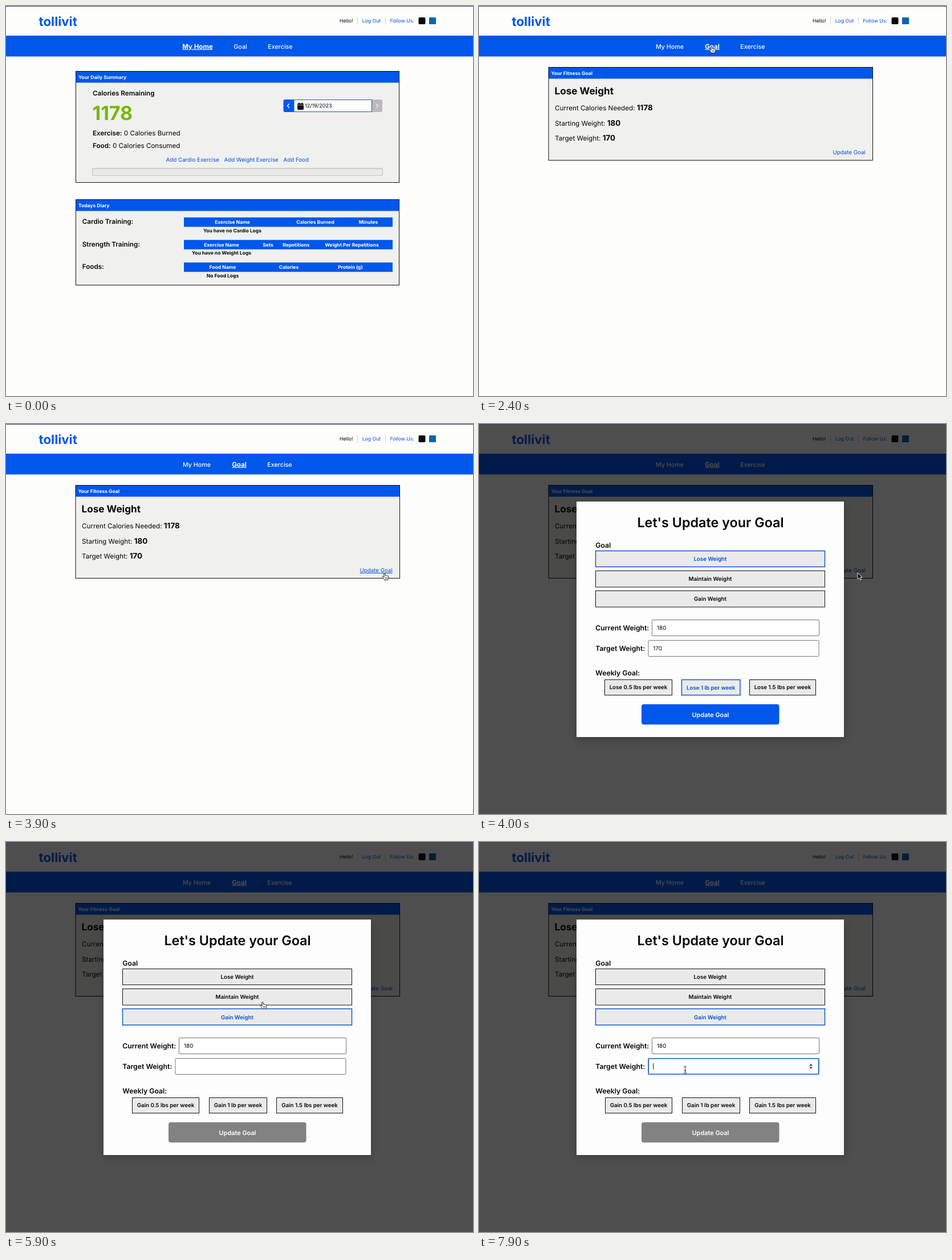
Write an HTML page that moves like this. It is 819 by 684 pixels and loops after 8000 ms.

```html
<!DOCTYPE html>
<html lang="en">
<head>
<meta charset="utf-8">
<title>Fitness goal demo</title>
<style>
html, body { margin: 0; width: 100%; height: 100%; overflow: hidden; background: #fdfdfc; }
svg { display: block; width: 819px; height: 684px; font-family: Inter, sans-serif; font-optical-sizing: none; text-rendering: geometricPrecision; }
text { white-space: pre; }
</style>
</head>
<body>
<svg id="stage" viewBox="0 0 819 684"></svg>
<script>
const BLUE = '#0057eb', LINK = '#0050d8', EDGE = '#0d5ad2', INK = '#050505', CARD = '#f0f0ee', LOOP = 8000;
const stage = document.getElementById('stage');

const text = (x, y, size, weight, str, fill = INK, anchor = 'start', extra = '') =>
  `<text x="${x}" y="${y}" font-size="${size}" font-weight="${weight}" fill="${fill}" text-anchor="${anchor}" ${extra}>${str}</text>`;
const mid = (x, y, size, weight, str, fill, extra) => text(x, y, size, weight, str, fill, 'middle', extra);
const box = (x, y, r, b, fill, stroke = 'none', width = 1, round = 0) =>
  `<rect x="${x}" y="${y}" width="${r - x}" height="${b - y}" rx="${round}" fill="${fill}" stroke="${stroke}" stroke-width="${width}"/>`;
const path = (d, fill, stroke = 'none', width = 1) =>
  `<path d="${d}" fill="${fill}" stroke="${stroke}" stroke-width="${width}" stroke-linejoin="round" stroke-linecap="round"/>`;
const group = (id, body) => `<g id="${id}">${body}</g>`;
const strong = (str, size) => `<tspan font-weight="700" font-size="${size}">${str}</tspan>`;
const under = 'text-decoration="underline"';

function header() {
  return text(57.5, 34.5, 22.3, 700, 'tollivit', BLUE) +
    text(585, 28.7, 8.7, 400, 'Hello!') +
    text(624.7, 28.7, 8.7, 400, 'Log Out', LINK) +
    text(673.5, 28.7, 8.7, 400, 'Follow Us:', LINK) +
    box(616, 19, 617, 33, '#cfcfcf') + box(665, 19, 666, 33, '#cfcfcf') +
    box(723.5, 20, 735.5, 32, '#0a0a0a', 'none', 0, 2) +
    box(742, 20, 754, 32, '#0b66b0', 'none', 0, 1) +
    box(0, 52, 819, 88.5, BLUE);
}

function card(x, y, r, b, title) {
  return box(x, y, r, b, CARD) + box(x, y, r, y + 20, BLUE) + box(x, y, r, b, 'none', '#111') +
    text(x + 4.5, y + 13.5, 8.5, 700, title, '#fff');
}

function table(y, label, heads, empty, emptyX) {
  return text(133.8, y + 11.4, 11.65, 600, label) + box(312, y, 678, y + 16.5, BLUE) +
    heads.map(([x, str]) => mid(x, y + 11.5, 8.5, 700, str, '#fff')).join('') +
    mid(emptyX, y + 26, 8.5, 700, empty);
}

function homePage() {
  return mid(336, 74.7, 11.5, 700, 'My Home', '#fff', under) +
    mid(411, 74.7, 10.7, 500, 'Goal', '#fff', 'id="homeGoal"') +
    mid(481, 74.7, 10.7, 500, 'Exercise', '#fff') +
    card(122.5, 114.5, 689.5, 309.5, 'Your Daily Summary') +
    text(152, 157.4, 11.65, 600, 'Calories Remaining') +
    text(151.5, 200.3, 34, 700, '1178', '#74b80a') +
    text(152, 227, 11.65, 400, '<tspan font-weight="600">Exercise:</tspan> 0 Calories Burned') +
    text(152, 249, 11.65, 400, '<tspan font-weight="600">Food:</tspan> 0 Calories Consumed') +
    mid(327.3, 273.3, 9.75, 400, 'Add Cardio Exercise', LINK) +
    mid(430.2, 273.3, 9.75, 400, 'Add Weight Exercise', LINK) +
    mid(508.7, 273.3, 9.75, 400, 'Add Food', LINK) +
    box(151.5, 284.5, 660.5, 297.5, '#e9e9e7', '#c6c6c4', 1, 1.5) +
    box(152, 285, 660, 286.5, '#d6d6d4') +
    box(486.5, 164, 510, 186, BLUE, 'none', 0, 3) +
    box(636, 164, 660, 186, '#bababa', 'none', 0, 3) +
    box(505, 164.5, 641.5, 185.5, '#fff', '#1d5aa8') +
    path('M496.6 171.8l-3.2 3.3 3.2 3.3', 'none', '#fff', 1.4) +
    path('M649.2 171.8l3.2 3.3-3.2 3.3', 'none', '#f4f4f4', 1.3) +
    box(511, 171, 522, 182, '#050505', 'none', 0, 1.4) +
    box(513, 169.5, 514.6, 172, '#050505') + box(518.4, 169.5, 520, 172, '#050505') +
    box(511, 173.4, 522, 174.1, '#fff') +
    text(524, 178.4, 9.1, 400, '12/19/2023') +
    card(122.5, 339.5, 689.5, 489.5, 'Todays Diary') +
    table(370.8, 'Cardio Training:', [[397, 'Exercise Name'], [542.5, 'Calories Burned'], [635.5, 'Minutes']], 'You have no Cardio Logs', 397) +
    table(410.3, 'Strength Training:', [[378, 'Exercise Name'], [459.5, 'Sets'], [508.7, 'Repetitions'], [606.5, 'Weight Per Repetitions']], 'You have no Weight Logs', 378) +
    table(449.8, 'Foods:', [[380, 'Food Name'], [496, 'Calories'], [604, 'Protein (g)']], 'No Food Logs', 380);
}

function goalPage() {
  return mid(334.5, 74.7, 10.7, 500, 'My Home', '#fff') +
    mid(409, 74.7, 11.5, 700, 'Goal', '#fff', under) +
    mid(480, 74.7, 10.7, 500, 'Exercise', '#fff') +
    card(122, 107.5, 690.5, 270.5, 'Your Fitness Goal') +
    text(132.6, 155.2, 17.1, 700, 'Lose Weight') +
    text(133, 183.2, 11.7, 400, 'Current Calories Needed: ' + strong('1178', 13.4)) +
    text(133, 209.5, 11.7, 400, 'Starting Weight: ' + strong('180', 13.4)) +
    text(133, 235.7, 11.7, 400, 'Target Weight: ' + strong('170', 13.4)) +
    mid(649.2, 260, 9.75, 400, 'Update Goal', LINK, 'id="update"');
}

function choice(x, y, r, b, str, on) {
  return box(x, y, r, b, '#ebeaea', on ? EDGE : '#111', on ? 1.5 : 1) +
    mid((x + r) / 2, (y + b) / 2 + (on ? 3.8 : 3.3), 9.7, 600, str, on ? LINK : INK);
}

function modalFrame() {
  return box(0, 1, 819, 684, 'rgba(0,0,0,.69)') +
    '<g filter="url(#soft)">' + box(171, 141, 640, 554, 'rgba(0,0,0,.22)') + '</g>' +
    box(171, 136, 640, 549, '#fdfdfd') +
    mid(406, 180.5, 23.35, 600, "Let's Update your Goal") +
    text(204.3, 216.6, 12.25, 600, 'Goal') +
    text(204.3, 362, 12.25, 600, 'Current Weight:') +
    text(204.3, 398, 12.25, 600, 'Target Weight:') +
    text(204.3, 440.5, 12.25, 600, 'Weekly Goal:') +
    box(303.5, 343.5, 596.5, 371.5, '#fff', '#767676', 1, 1.5) +
    text(312, 361, 9.9, 400, '180') +
    choice(204.5, 257.5, 606.5, 286, 'Maintain Weight');
}

// The parts of the form that depend on the chosen goal.
function form(verb) {
  const gain = verb === 'Gain';
  const weeks = gain ? [[221.5, 338.5], [356.5, 457.5], [474.5, 590.5]] : [[220.5, 338.5], [355.5, 458], [474.5, 590.5]];
  return choice(204.5, 222.5, 606.5, 250.5, 'Lose Weight', !gain) +
    choice(204.5, 292.5, 606.5, 321, 'Gain Weight', gain) +
    box(297, 379.5, 596, 407.5, '#fff', '#767676', 1, 1.5) +
    (gain ? '' : text(305.2, 397, 9.9, 400, '170')) +
    ['0.5 lbs', '1 lb', '1.5 lbs'].map((rate, i) =>
      choice(weeks[i][0], 448.5, weeks[i][1], 475.5, `${verb} ${rate} per week`, !gain && i === 1)).join('') +
    box(285, 491.5, 526.5, 527, gain ? '#828282' : BLUE, 'none', 0, 4) +
    mid(406, 513.5, 10.9, 600, 'Update Goal', '#fff');
}

const spinner = box(577.5, 387.5, 586.5, 399, '#efefef') +
  path('M579.4 392.2h5.2l-2.6-3.2zM579.4 394.6h5.2l-2.6 3.2z', '#333');

const cursors = {
  arrow: path('M0 0V10.6L2.5 8.4 4.2 12.2 6.2 11.3 4.5 7.6H7.8Z', '#000', '#fff', .9),
  hand: path('M-1.2 1C-1.2-.4 1-.4 1 1V4.3C1.6 3.6 2.8 3.9 3 4.7 3.6 4 4.8 4.4 5 5.2 5.7 4.7 6.8 5.1 6.8 6.2V8.2C6.8 9.6 6 10.3 5.8 12H-.4C-.6 10.6-3 8.6-3.8 6.9-4.3 5.8-2.9 5.2-2.2 6L-1.2 7Z', '#fff', '#111', .9) +
    path('M1.2 7.6V9.8M2.9 7.6V9.8M4.6 7.6V9.8', 'none', '#111', .7),
  beam: path('M-2-6.2Q0-6.2 0-5V5Q0 6.2-2 6.2M2-6.2Q0-6.2 0-5M2 6.2Q0 6.2 0 5M-1 1.5H1', 'none', '#222', 1)
};

stage.innerHTML =
  '<defs><filter id="soft" x="-10%" y="-10%" width="120%" height="120%"><feGaussianBlur stdDeviation="8"/></filter></defs>' +
  box(0, 0, 819, 684, '#fdfdfc') + header() + group('home', homePage()) + group('goal', goalPage()) +
  group('modal', modalFrame() + group('lose', form('Lose')) + group('gain', form('Gain')) +
    group('focus', box(297.3, 379.8, 595.7, 407.2, 'none', EDGE, 1.6, 1.5)) +
    group('caret', box(305.3, 388, 306.3, 399, '#111')) + group('spin', spinner)) +
  box(0, 0, 819, 1, '#3e3e5c') +
  group('pointer', Object.keys(cursors).map(k => group(k, cursors[k])).join(''));

const el = id => document.getElementById(id);
const show = (id, on) => el(id).setAttribute('display', on ? 'inline' : 'none');
const underline = (id, on) => el(id).setAttribute('text-decoration', on ? 'underline' : 'none');

// time, x, y of the pointer
const route = [
  [1000, 352, 560], [1300, 393.5, 69], [1600, 408, 70.5], [2700, 408, 70.5], [3200, 560, 270],
  [3700, 664, 261.5], [4100, 664, 261.5], [4600, 452, 305], [5200, 452, 305], [5900, 450, 280.5],
  [6100, 448, 284], [6700, 361.5, 399.5], [8000, 361.5, 399.5]
];
const looks = [[1000, 'arrow'], [1400, 'hand'], [2900, 'arrow'], [3600, 'hand'], [4000, 'arrow'], [4500, 'hand'], [6300, 'arrow'], [6600, 'beam']];

function place(t) {
  const i = Math.max(1, route.findIndex(p => p[0] > t));
  const [t0, x0, y0] = route[i - 1], [t1, x1, y1] = route[i];
  const u = Math.min(1, Math.max(0, (t - t0) / (t1 - t0))), e = u * u * (3 - 2 * u);
  return [x0 + (x1 - x0) * e, y0 + (y1 - y0) * e];
}

function draw(now) {
  const t = Math.floor(now % LOOP / 100) * 100;
  const goal = t >= 2000, gain = t >= 4700, focus = t >= 6800;
  show('home', !goal);
  show('goal', goal);
  show('modal', t >= 4000);
  show('lose', !gain);
  show('gain', gain);
  show('focus', focus);
  show('caret', focus && (t - 6800) % 1000 < 500);
  show('spin', t >= 6600);
  underline('homeGoal', t >= 1400);
  underline('update', t >= 3600 && t < 4000);
  show('pointer', t >= 1000);
  const look = looks.filter(l => l[0] <= t).pop();
  for (const k in cursors) show(k, look && look[1] === k);
  el('pointer').setAttribute('transform', `translate(${place(t).join(' ')})`);
}

const start = performance.now();
function tick() {
  draw(performance.now() - start);
  requestAnimationFrame(tick);
}
tick();
</script>
</body>
</html>
```
